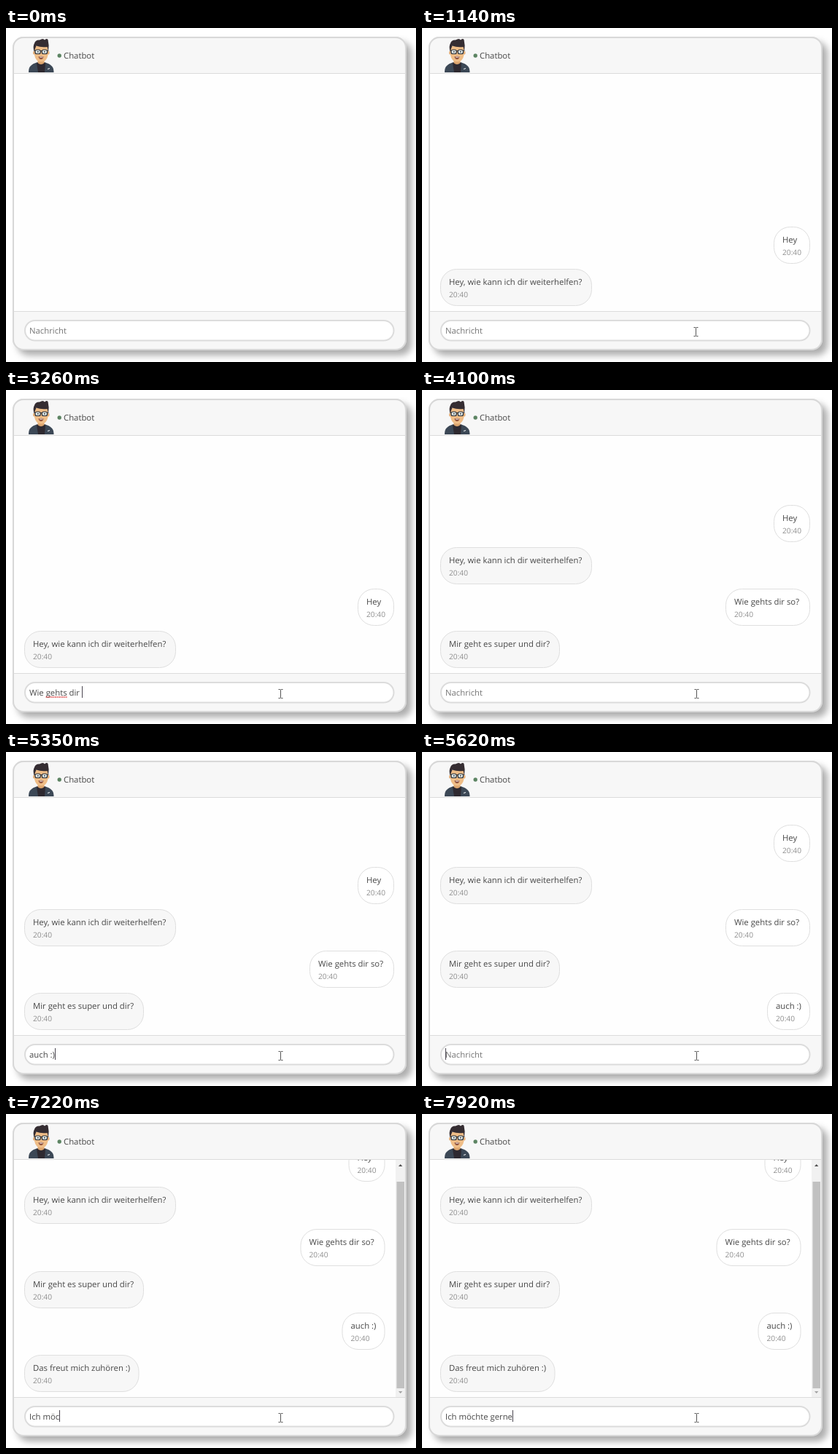
An HTML page for the animation above (8 s loop, 562 px wide and 459 px high).

```html
<!DOCTYPE html>
<html lang="de">
<head>
<meta charset="utf-8">
<title>Chatbot</title>
<style>
  html, body { margin: 0; width: 100%; height: 100%; overflow: hidden; background: #fff; }
  svg { display: block; width: 562px; height: 459px; }
  text { font: 11.34px "Open Sans", "Noto Sans", sans-serif; fill: #484848; white-space: pre; text-rendering: geometricPrecision; }
  .time { font-size: 10.2px; fill: #8e8e8e; }
  .panel { filter: drop-shadow(7px 7px 5px rgba(0, 0, 0, .32)); }
  .placeholder { fill: #757575; }
</style>
</head>
<body>
<svg viewBox="0 0 562 459" xmlns="http://www.w3.org/2000/svg">
  <defs>
    <clipPath id="inside"><rect x="10" y="13" width="538" height="429" rx="14"/></clipPath>
    <clipPath id="chatArea"><rect x="11" y="63" width="536" height="326"/></clipPath>
  </defs>

  <rect class="panel" x="9" y="12" width="540" height="431" rx="15" fill="#d8d8d8"/>
  <g clip-path="url(#inside)">
    <rect x="10" y="13" width="538" height="430" fill="#f7f7f7"/>
    <rect x="10" y="63" width="538" height="326" fill="#fefefe"/>
    <path d="M10 62.5H548M10 389.5H548" stroke="#dcdcdc"/>
  </g>
  <rect x="10" y="13" width="538" height="429" rx="14" fill="none" stroke="#d8d8d8" stroke-width="2"/>

  <g id="avatar">
    <path d="M31 61C31 53 34 50 43 47H53C62 50 65.500 53 65.500 61Z" fill="#3c4856"/>
    <path d="M42 48L44 61H53L54 48Z" fill="#2e2930"/>
    <path d="M43.500 41H52.500V48Q48 52 43.500 48Z" fill="#dda66f"/>
    <ellipse cx="38.500" cy="34" rx="1.500" ry="2.500" fill="#e2ad77"/>
    <ellipse cx="58" cy="34" rx="1.500" ry="2.500" fill="#e2ad77"/>
    <path d="M39 25H57.500V37Q56 46.500 48.200 46.500Q40.500 46.500 39 37Z" fill="#efbd87"/>
    <path d="M38.500 32Q36.500 25 39 21Q40.500 16 46 16.500Q51 13.500 53 16.500Q56 14 57.500 16Q59.500 24 58 32L56.500 26Q48 27 41.500 24.500Z" fill="#352d32"/>
    <g fill="#d9e2e2" stroke="#292d34" stroke-width="1.200">
      <rect x="40" y="30" width="7.200" height="5.500" rx="2"/>
      <rect x="49.300" y="30" width="7.200" height="5.500" rx="2"/>
      <path d="M38 31H40M47 31.500H49.500M56.500 31H58.500"/>
    </g>
    <path d="M43 32.700H44.500M52 32.700H53.500" stroke="#292d34" stroke-width="1.500"/>
    <path d="M44.500 39.500Q48.200 38 51.500 39.500Q50.500 43 48 43T44.500 39.500Z" fill="#8b4c39"/>
    <path d="M46 40H50.500" stroke="#fff"/>
    <path d="M57 56.500L60 55.500" stroke="#e9eef0" stroke-width="1.200"/>
  </g>
  <circle cx="73.200" cy="38" r="2.700" fill="#5c8462"/>
  <text x="79" y="42">Chatbot</text>

  <g clip-path="url(#chatArea)">
    <g id="messages"></g>
    <g id="scrollbar">
      <rect x="534" y="63" width="13" height="326" fill="#f1f1f1"/>
      <rect x="535.500" y="93" width="10.500" height="284" fill="#c1c1c1"/>
      <path d="M538 72L540.700 69L543.400 72Z" fill="#505050"/>
      <path d="M538 381L540.700 384L543.400 381Z" fill="#a3a3a3"/>
    </g>
  </g>

  <rect x="26" y="402" width="505.500" height="27.500" rx="13.750" fill="#fff" stroke="#dcdcdc" stroke-width="2"/>
  <text id="field" x="32" y="420" xml:space="preserve"></text>
  <path id="misspelt" fill="none" stroke="#e04444" stroke-width="1.300" stroke-dasharray="1.700 .800"/>
  <rect id="caret" y="407" width="1" height="16" fill="#4a4650"/>
  <path id="pointer" d="M-3 -6H-1Q0 -6 0 -5Q0 -6 1 -6H3M0 -5V5M-3 6H-1Q0 6 0 5Q0 6 1 6H3" fill="none" stroke="#555"/>
</svg>
<script>
const LOOP = 8000, STEP = 57.75, LAST_TOP = 331;
const $ = id => document.getElementById(id);

const messages = [
  { at: 870, text: "Hey", width: 49, own: true },
  { at: 1140, text: "Hey, wie kann ich dir weiterhelfen?", width: 207 },
  { at: 3870, text: "Wie gehts dir so?", width: 115, own: true },
  { at: 4100, text: "Mir geht es super und dir?", width: 163 },
  { at: 5620, text: "auch :)", width: 58, own: true },
  { at: 5850, text: "Das freut mich zuhören :)", width: 156.5 },
];

// Input states in order of time: contents and whether the caret shows.
const states = [];
const set = (at, text, caret = true) => states.push({ at, text, caret });
function spread(from, to, texts) {
  const gap = (to - from) / Math.max(1, texts.length - 1);
  texts.forEach((text, i) => set(Math.round(from + i * gap), text));
}
const type = (from, to, base, added) =>
  spread(from, to, [...added].map((_, i) => base + added.slice(0, i + 1)));
function sendAndBlink(at, replyAt, caretAt) {
  set(at, "");
  set(replyAt, "", false);
  set(caretAt, "");
}

set(0, "", false);
set(140, "");
set(370, "", false);
type(470, 680, "", "Hey");
sendAndBlink(870, 1140, 1410);
set(1600, "W");
type(1790, 2130, "W", "ie geh");
type(2360, 2820, "Wie geh", "ts dri ");
spread(2970, 3260, ["dri", "dr", "d", "di", "dir", "dir "].map(s => "Wie gehts " + s));
type(3420, 3610, "Wie gehts dir ", "so?");
sendAndBlink(3870, 4100, 4370);
set(4640, "", false);
type(4690, 4900, "", "auch ");
set(5170, "auch ", false);
set(5200, "auch :");
set(5350, "auch :)");
sendAndBlink(5620, 5850, 6120);
set(6390, "", false);
type(6650, 6910, "", "Ich m");
type(7140, 7290, "Ich m", "öch");
type(7440, 7920, "Ich möch", "te gerne");

function add(parent, tag, attrs, content = "") {
  const node = document.createElementNS("http://www.w3.org/2000/svg", tag);
  for (const name in attrs) node.setAttribute(name, attrs[name]);
  node.textContent = content;
  return parent.appendChild(node);
}

for (const m of messages) {
  m.node = add($("messages"), "g", {});
  add(m.node, "rect", { width: m.width, height: 50, rx: 22, fill: m.own ? "#fff" : "#f7f7f7", stroke: "#dfdfdf" });
  add(m.node, "text", { x: 11.5, y: 21.5 }, m.text);
  add(m.node, "text", { x: 11.5, y: 38.5, class: "time" }, "20:40");
}

function drawMessages(t) {
  const count = messages.filter(m => t >= m.at).length;
  const overflow = count === messages.length;
  $("scrollbar").style.display = overflow ? "" : "none";
  messages.forEach((m, i) => {
    m.node.style.display = i < count ? "" : "none";
    const x = m.own ? (overflow ? 519 : 531.5) - m.width : 25.5;
    const y = Math.round(LAST_TOP - STEP * (count - 1 - i)) + 0.5;
    m.node.setAttribute("transform", `translate(${x} ${y})`);
  });
}

function drawInput(t) {
  const { text, caret } = states.findLast(s => t >= s.at);
  const field = $("field");
  field.textContent = text || "Nachricht";
  field.setAttribute("class", text ? "" : "placeholder");
  const end = text ? field.getEndPositionOfChar(text.length - 1).x : 32;
  $("caret").setAttribute("x", Math.round(end));
  $("caret").style.display = caret ? "" : "none";
  const lines = [...text.matchAll(/(gehts|dri)(?= )/g)].map(({ 0: word, index }) =>
    `M${field.getStartPositionOfChar(index).x} 422H${field.getEndPositionOfChar(index + word.length - 1).x}`);
  $("misspelt").setAttribute("d", lines.join(""));
}

function drawPointer(t) {
  const p = Math.min(1, Math.floor((t - 30) / 36.6) / 3);
  const x = t >= 3000 ? 376.5 : 390.5 - 15 * p;
  const y = 425 - 7.5 * p;
  $("pointer").style.display = t < 30 ? "none" : "";
  $("pointer").setAttribute("transform", `translate(${x} ${y})`);
}

const start = performance.now();
function frame() {
  const t = (performance.now() - start) % LOOP;
  drawMessages(t);
  drawInput(t);
  drawPointer(t);
  requestAnimationFrame(frame);
}
frame();
</script>
</body>
</html>
```
